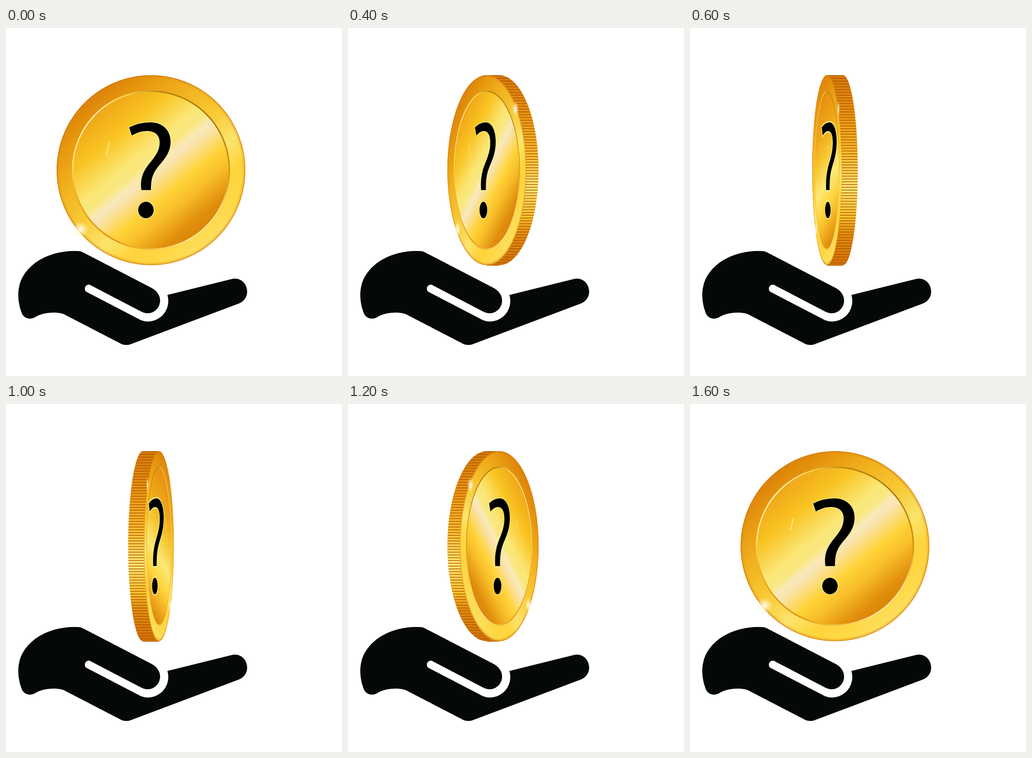
Recreate the animation shown at these times as an HTML page with a canvas. Size 737 by 760 pixels, loop 1.8 s.

```html
<!DOCTYPE html>
<html lang="en">
<head>
<meta charset="utf-8">
<title>Spinning coin</title>
<style>
html, body { margin: 0; width: 100%; height: 100%; overflow: hidden; background: #fff; }
canvas { display: block; }
</style>
</head>
<body>
<canvas id="stage" width="737" height="760"></canvas>
<script>
const ctx = document.getElementById('stage').getContext('2d');
const CX = 318, CY = 310.5, R = 207.5, INNER = 173.5, STEP = 200;

// half: half width of the face, depth: visible rim, dir: turning side,
// mark: width factor of the question mark, dot: x of its dot
const pose = (half, depth, dir, mark, dot) => ({ half, depth, dir, mark, dot });
const poses = [
  pose(207, 0, 1, 1, 307),
  pose(166.5, 17, 1, 0.72, 294.5),
  pose(86.5, 27, 1, 0.5, 297),
  pose(32.5, 35, 1, 0.36, 302.3),
  pose(0, 36, 1, 0, 0),
  pose(32.5, 35, -1, 0.36, 326.5),
  pose(86.5, 27, -1, 0.5, 328),
  pose(166.5, 17, -1, 0.72, 328),
  pose(207, 0, 1, 1, 307)
];

const hand = new Path2D(`M168 489.500L320 568C331 574 338 584 338 595C338 611 325 623 311 623
  C305 623 300 621 296 619L186 562C180 558 173 563 173 569C173 573 175 576 178 577
  L290 635C297 639 304 641 311 641C336 641 356 621 356 596C356 591 355 587 354 583
  L496 548C513 544 529 557 529 576C529 588 521 598 510 602L275 690C268 693 260 693 253 690
  L127 625Q120 622 108 621.500C90 621 74 625 63 632C52 638 38 634 34 621C26 600 25 577 30 560
  C42 518 90 487 150 487C158 487 163 487 168 489.500Z`);
const mark = new Path2D(`M270 217Q292 206 317 206C343 206 361 223 361 248C361 268 352 282 336 300
  C322 317 318 328 318 354L297 354C294 330 299 315 316 294C330 277 337 266 337 250
  C337 234 327 225 309 225C297 225 286 229 276 235Z
  M324 397.500A17 18 0 1 1 290 397.500A17 18 0 1 1 324 397.500Z`);

function linear(x0, y0, x1, y1, stops) {
  const g = ctx.createLinearGradient(x0, y0, x1, y1);
  stops.forEach(([at, color]) => g.addColorStop(at, color));
  return g;
}

// gradient through the face centre along the axis (x, y)
const across = (x, y, r, stops) => linear(-x * r, -y * r, x * r, y * r, stops);

function disc(r, fill) {
  ctx.beginPath();
  ctx.arc(0, 0, r, 0, 2 * Math.PI);
  ctx.fillStyle = fill;
  ctx.fill();
}

function ring(r, width, stroke) {
  ctx.beginPath();
  ctx.arc(0, 0, r, 0, 2 * Math.PI);
  ctx.lineWidth = width;
  ctx.strokeStyle = stroke;
  ctx.stroke();
}

function sparkle(x, y) {
  const g = ctx.createRadialGradient(x, y, 0, x, y, 18);
  g.addColorStop(0, '#fff');
  g.addColorStop(0.2, 'rgba(255,250,225,.85)');
  g.addColorStop(1, 'rgba(255,240,190,0)');
  ctx.fillStyle = g;
  ctx.fillRect(x - 18, y - 18, 36, 36);
}

function glint(x0, y0, x1, y1) {
  ctx.beginPath();
  ctx.moveTo(x0, y0);
  ctx.lineTo(x1, y1);
  ctx.lineWidth = 1.5;
  ctx.strokeStyle = '#fdf3b4';
  ctx.stroke();
}

function drawSide({ half, depth }) {
  const left = CX - depth / 2, top = CY - R, height = 2 * R + 1;
  ctx.save();
  ctx.beginPath();
  ctx.rect(left, top, depth, height);
  if (half) {
    for (const x of [left, left + depth]) {
      ctx.moveTo(x + half, CY);
      ctx.ellipse(x, CY, half, R, 0, 0, 2 * Math.PI);
    }
  }
  ctx.clip();
  ctx.fillStyle = linear(0, top, 0, top + height, [
    [0, '#d57a08'], [0.2, '#e8950f'], [0.4, '#f8bd2b'], [0.59, '#fbe874'],
    [0.74, '#fbc52d'], [0.83, '#e2900f'], [1, '#d27304']
  ]);
  ctx.fillRect(0, top, 737, height);
  ctx.fillStyle = 'rgba(172,78,0,.75)';
  for (let y = top; y < top + height; y += 6.1) ctx.fillRect(0, y, 737, 1.9);
  ctx.restore();
}

function drawFace({ half, depth, dir }) {
  const thin = half < 50;
  const [ax, ay] = thin ? [0.25, 0.97] : [0.63, 0.77];
  ctx.save();
  ctx.translate(CX - dir * depth / 2, CY);
  ctx.scale(dir * half / R, 1);

  disc(R, across(ax, ay, R, [
    [0, '#dc8208'], [0.12, '#e7980f'], [0.3, '#f2b320'], [0.48, '#f8ca35'],
    [0.65, '#fbe46c'], [0.78, '#ffd43c'], [0.9, '#ffd846'], [1, '#fbe062']
  ]));
  ring(R - 3, 5, 'rgba(222,140,20,.28)');
  ring(R - 1, 2, 'rgba(205,115,10,.6)');

  disc(INNER, across(ax, ay, INNER, thin
    ? [[0, '#e58f0c'], [0.25, '#f0a91c'], [0.4, '#f7c833'], [0.57, '#fbe876'],
       [0.72, '#ffd43e'], [0.86, '#f1ad1f'], [1, '#dd850a']]
    : [[0, '#efa718'], [0.19, '#f9c422'], [0.38, '#fbe676'], [0.45, '#f9e880'],
       [0.5, '#f9e9b8'], [0.54, '#f9e4b0'], [0.68, '#ffd338'], [0.78, '#f8be2a'],
       [0.93, '#e08d0c'], [1, '#dc8608']]));
  const groove = ctx.createConicGradient(0, 0, 0);
  [[0, '#cf930f'], [0.08, '#f6d98a'], [0.17, '#fae6a8'], [0.25, '#f3c040'],
   [0.33, '#e08c0c'], [0.44, '#eba61c'], [0.52, '#fbe47c'], [0.62, '#fdf0b8'],
   [0.7, '#f7d45c'], [0.77, '#b98310'], [0.88, '#a87408'], [1, '#cf930f']
  ].forEach(([at, color]) => groove.addColorStop(at, color));
  ring(INNER - 1, 3, groove);

  glint(-91, -63, -98, -35);
  glint(6, -50, 22, -51);
  sparkle(-155, 129.5);
  if (depth) sparkle(thin ? 161 : 151, -133.5);
  ctx.restore();
}

function drawMark({ half, mark: scale, dot }) {
  ctx.save();
  ctx.translate(dot, 0);
  ctx.scale(scale, 1);
  ctx.translate(-307, 0);
  ctx.lineWidth = half < 50 ? 6 : 3;
  ctx.strokeStyle = '#fcf083';
  ctx.stroke(mark);
  ctx.fillStyle = '#000';
  ctx.fill(mark);
  ctx.restore();
}

function render(now) {
  const p = poses[Math.floor(now / STEP) % poses.length];
  ctx.fillStyle = '#fff';
  ctx.fillRect(0, 0, 737, 760);
  ctx.fillStyle = '#040808';
  ctx.fill(hand);
  if (p.depth) drawSide(p);
  if (p.half) {
    drawFace(p);
    drawMark(p);
  }
}

const start = performance.now();
function frame() {
  render(performance.now() - start);
  requestAnimationFrame(frame);
}
frame();
</script>
</body>
</html>
```
